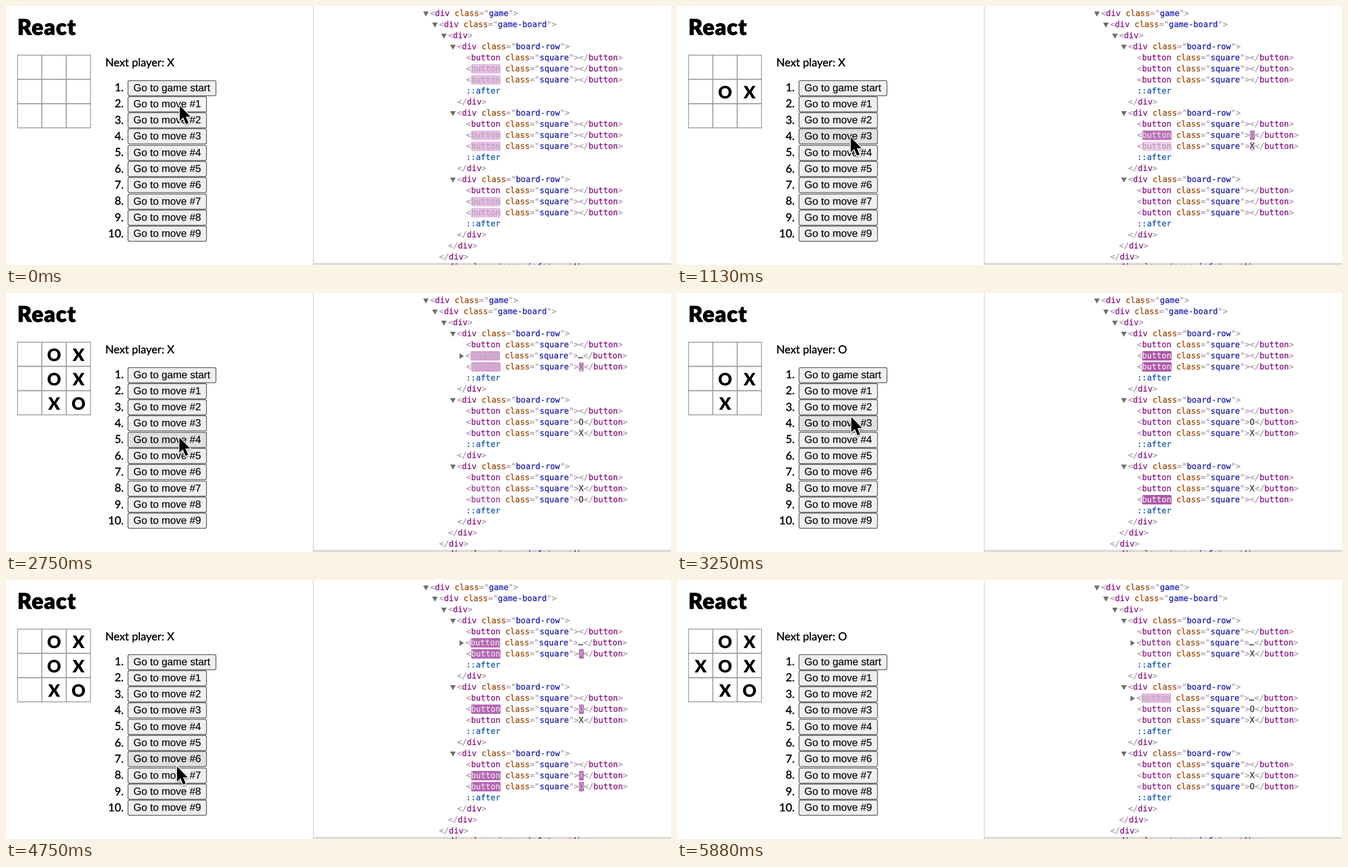
An HTML page for the animation above (6.01 s loop, 1198 by 468 pixels).

```html
<!DOCTYPE html>
<html lang="en">
<head>
<meta charset="utf-8">
<title>Tic-tac-toe history</title>
<style>
  html, body { margin: 0; width: 100%; height: 100%; overflow: hidden; background: #fff; }
  #stage { position: relative; width: 1198px; height: 468px; overflow: hidden; background: #fff;
    color: #000; font: 20px/24px Lato, "Open Sans", sans-serif; text-rendering: geometricPrecision; }
  #stage > * { position: absolute; white-space: pre; }
  h1 { left: 20.5px; top: 15px; margin: 0; font-size: 39px; line-height: 47px; font-weight: 900;
    letter-spacing: .035em; -webkit-text-stroke: 1.1px #000; }
  #status { left: 179px; top: 90px; -webkit-text-stroke: .45px #000; }
  .cell { width: 45.4px; height: 45.4px; box-shadow: inset 0 0 0 1.4px #999; text-align: center;
    font-size: 31px; line-height: 46px; font-weight: 900; }
  .num { left: 152px; width: 60px; line-height: 28px; text-align: right; -webkit-text-stroke: .45px #000; }
  .btn { box-sizing: border-box; left: 218.5px; width: 143.5px; height: 29px;
    box-shadow: inset 0 0 0 1.5px #666; border-radius: 4px; background: #efefef; padding-left: 11px;
    font: 18.6px/28px "Liberation Sans", Arial, sans-serif; -webkit-text-stroke: .15px #000; }
  #divider { left: 553px; top: 0; width: 1px; height: 468px; background: #c8c8c8; }
  #strip { left: 554px; top: 464px; width: 644px; height: 4px; background: #dcdcdc; }
  .line { font: 14.667px/20px "DejaVu Sans Mono", "Liberation Mono", monospace; color: #a894a6;
    -webkit-text-stroke: .25px; }
  .line span { border-radius: 2px; }
  .tag { color: #881280; }
  .attr { color: #994500; }
  .val { color: #1a1aa6; }
  .pseudo { color: #1155b4; }
  .txt { color: #303030; }
  .tri { width: 10px; height: 9px; background: #6e6e6e; clip-path: polygon(0 0, 100% 0, 50% 100%); }
  .tri.shut { width: 8px; height: 10px; clip-path: polygon(0 0, 100% 50%, 0 100%); }
  #ring { left: 0; top: 0; box-sizing: border-box; width: 90px; height: 90px; border: 2px solid #1c1c1c;
    border-radius: 50%; background: rgba(90, 50, 90, .025); }
  #cursor { left: -6px; top: -4.5px; filter: drop-shadow(0 2px 1.5px rgba(0, 0, 0, .35)); }
</style>
</head>
<body>
<div id="stage">
  <h1>React</h1>
  <div id="status"></div>
  <div id="divider"></div>
  <div id="strip"></div>
</div>
<script>
const LOOP = 6010, STEP = 125, FRAMES = 48;
const FLASH = 1400, PALE_AT = FLASH * .8;
const ORDER = [5, 4, 7, 8, 2, 1, 3];       // square taken by each move
const COLLAPSED = [1, 3];                  // squares the inspector shows folded
// [time, move number jumped to]
const CLICKS = [[-700, 0], [250, 1], [875, 2], [1500, 4], [2250, 6], [3120, 3], [3750, 1], [4550, 6], [5220, 7]];
// [time, x, y] of the pointer tip
const PATH = [
  [0, 313, 178], [250, 313, 178], [625, 313, 208], [875, 313, 209], [1125, 313, 235], [1375, 313, 267],
  [1500, 313, 267], [2000, 311, 322], [2125, 310, 325], [2375, 310, 325], [2875, 313, 237], [3125, 314, 235],
  [3250, 314, 222], [3500, 313, 180], [3750, 313, 179], [4125, 310, 304], [4250, 310, 314], [4375, 310, 322],
  [4625, 309, 325], [5000, 306, 354], [5250, 305, 364], [5375, 330, 368], [5625, 900, 380], [5800, 1215, 385]
];
const stage = document.getElementById('stage');
const statusLine = document.getElementById('status');

function add(cls, css, html = '') {
  const el = document.createElement('div');
  el.className = cls;
  el.style.cssText = css;
  el.innerHTML = html;
  stage.append(el);
  return el;
}

const span = (cls, text) => `<span class="${cls}">${text}</span>`;
const open = (tag, name) => '&lt;' + span('tag', tag) +
  (name ? ` ${span('attr', 'class')}="${span('val', name)}"` : '') + '&gt;';
const close = tag => '&lt;/' + span('tag', tag) + '&gt;';

// Left side: board and move list
const cells = [...Array(9).keys()].map(i =>
  add('cell', `left:${20 + i % 3 * 44}px;top:${88 + Math.floor(i / 3) * 44}px`));

const ROW_TOP = 133.5, ROW_H = 29.33;
const buttons = [...Array(10).keys()].map(i => {
  const top = ROW_TOP + i * ROW_H;
  add('num', `top:${top - .5}px`, `${i + 1}.`);
  return add('btn', `top:${top}px;${i ? '' : 'width:160px'}`, i ? `Go to move #${i}` : 'Go to game start');
});

// Right side: element tree
let row = 0;
const indent = depth => 764 + depth * 16.2;
function line(depth, html, foldable) {
  const y = row++ * 20;
  if (foldable) add('tri', `left:${indent(depth) - 12.5}px;top:${y + 10}px`);
  return add('line', `left:${indent(depth)}px;top:${y + 4}px`, html);
}

const nodes = [];
line(0, open('div', 'game'), true);
line(1, open('div', 'game-board'), true);
line(2, open('div'), true);
for (let r = 0; r < 3; r++) {
  line(3, open('div', 'board-row'), true);
  for (let c = 0; c < 3; c++) {
    const el = line(4, open('button', 'square') + span('txt', '') + close('button'));
    const y = (row - 1) * 20;
    nodes.push({
      el, tag: el.querySelector('.tag'), txt: el.querySelector('.txt'),
      tri: add('tri shut', `left:817px;top:${y + 9}px`)
    });
  }
  line(4, span('pseudo', '::after'));
  line(3, close('div'));
}
line(2, close('div'));
line(1, close('div'));
line(1, ' ' + open('div', 'game-info') + '…' + close('div')).style.top = '462px';

const ring = add('', '');
ring.id = 'ring';
const cursor = add('', '', `<svg width="40" height="50" viewBox="-6 -6 40 50" style="display:block">
  <path d="M0 0V27.5L6.3 21.6L11.2 33.2L15.8 31.2L11 20H19.5Z" fill="#000" stroke="#fff"
    stroke-width="3" paint-order="stroke" stroke-linejoin="round"/></svg>`);
cursor.id = 'cursor';

// Update highlight of the inspector: purple, pale pink, then gone
const WHITE = [255, 255, 255], DEEP = [158, 54, 153], PALE = [245, 219, 244];
const GREY = [168, 148, 166], PURPLE = [136, 18, 128], DARK = [48, 48, 48];
const out = x => 1 - (1 - x) ** 1.75;
const mix = (a, b, f) => `rgb(${a.map((v, i) => Math.round(v + (b[i] - v) * f))})`;

function flash(el, age, mid, rest) {
  if (age >= FLASH) {
    el.style.background = el.style.color = '';
    return;
  }
  const early = age < PALE_AT;
  const f = out(early ? age / PALE_AT : (age - PALE_AT) / (FLASH - PALE_AT));
  el.style.background = early ? mix(DEEP, PALE, f) : mix(PALE, WHITE, f);
  el.style.color = early ? mix(WHITE, mid, f) : mix(mid, rest, f);
}

function pointer(t) {
  const i = PATH.findIndex(p => p[0] > t);
  if (i < 0) return [1300, 385];
  const [t0, x0, y0] = PATH[i - 1], [t1, x1, y1] = PATH[i];
  const f = (t - t0) / (t1 - t0);
  return [x0 + (x1 - x0) * f, y0 + (y1 - y0) * f];
}

const place = (el, x, y) => { el.style.transform = `translate(${x}px,${y}px)`; };

function draw(t) {
  let move = 6;
  const changed = Array(9).fill(-Infinity);
  for (const [at, to] of CLICKS) {
    if (at > t) break;
    for (let m = Math.min(move, to); m < Math.max(move, to); m++) changed[ORDER[m]] = at;
    move = to;
  }
  statusLine.textContent = 'Next player: ' + 'XO'[move % 2];

  nodes.forEach((n, i) => {
    const m = ORDER.indexOf(i);
    const mark = m >= 0 && m < move ? 'XO'[m % 2] : '';
    const folded = mark !== '' && COLLAPSED.includes(i);
    const age = t - changed[i];
    cells[i].textContent = mark;
    n.txt.textContent = folded ? '…' : mark;
    n.tri.style.visibility = folded ? 'visible' : 'hidden';
    n.el.style.marginLeft = folded ? '-1px' : '0';
    flash(n.tag, age, GREY, PURPLE);
    flash(n.txt, folded ? FLASH : age, DARK, DARK);
  });

  const [x, y] = pointer(t);
  const over = x > 219 && x < 362 ? Math.floor((y - ROW_TOP) / ROW_H) : -1;
  const pressed = t < 250;
  buttons.forEach((b, i) => {
    b.style.background = i !== over ? '#efefef' : pressed ? '#f5f5f5' : '#e0e0e0';
  });
  place(cursor, x, y);
  place(ring, x - 49.5, y - 46);
  const ringOn = [2125, 4250].some(s => t >= s && t < s + 2 * STEP);
  ring.style.visibility = ringOn ? 'visible' : 'hidden';
}

const start = performance.now();
function tick(now) {
  const t = Math.max(0, now - start) % LOOP;
  draw(Math.min(FRAMES - 1, Math.floor(t / STEP)) * STEP);
  requestAnimationFrame(tick);
}
draw(0);
requestAnimationFrame(tick);
</script>
</body>
</html>
```
